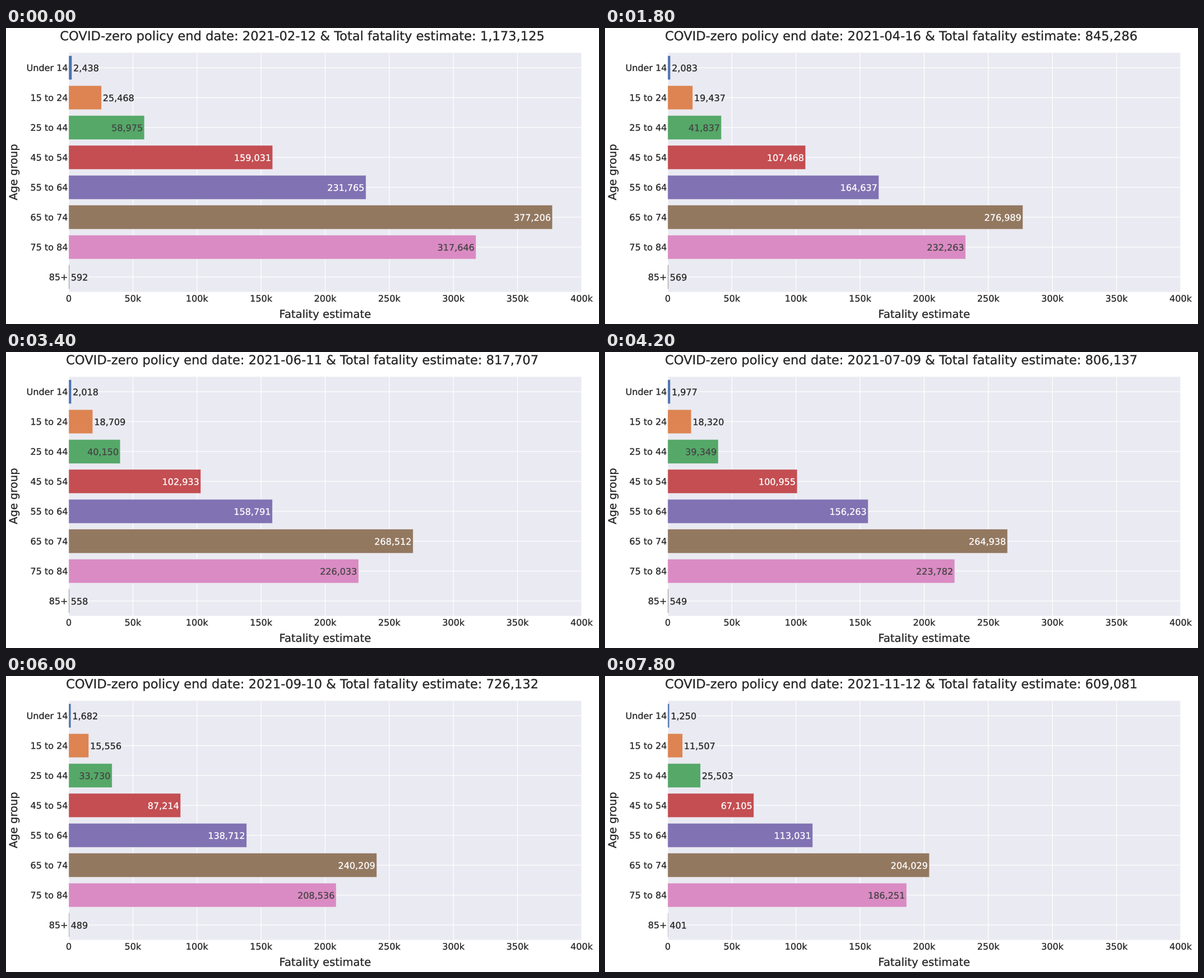
Animation, 1058 px wide and 529 px high, one loop 8000 ms. Source, as a matplotlib script:

```python
import numpy as np
import matplotlib.pyplot as plt
from matplotlib.animation import FuncAnimation
from matplotlib.patches import Rectangle
from matplotlib.patheffects import Stroke

plt.rcParams["font.family"] = "DejaVu Sans"
plt.rcParams["text.hinting"] = "none"

W, H, DPI = 1058, 529, 64
PT = 72 / DPI  # points per pixel
STEPS, INTERVAL = 40, 200
START = np.datetime64("2021-02-12")

# Plot area in pixels
LEFT, RIGHT, TOP, BOTTOM = 112, 1027, 44.3, 471.7
X_MAX = 400_000
PITCH = (BOTTOM - TOP) / 8
BAR_H = 0.8 * PITCH
MIN_INSIDE = 63  # narrowest bar that holds its label

INK, DARK, PAPER = "#242424", "#444444", "#eaeaf2"

# Name, fill, inside label colour, first and last count,
# and the share of the fall that belongs to the slow trend
GROUPS = [
    ("Under 14", "#4c72b0", DARK, 2438, 1250, 0.74),
    ("15 to 24", "#dd8452", DARK, 25468, 11507, 0.59),
    ("25 to 44", "#55a868", DARK, 58975, 25503, 0.50),
    ("45 to 54", "#c44e52", "white", 159031, 67105, 0.445),
    ("55 to 64", "#8172b3", "white", 231765, 113031, 0.44),
    ("65 to 74", "#937860", "white", 377206, 204029, 0.425),
    ("75 to 84", "#da8bc3", DARK, 317646, 186251, 0.345),
    ("85+", "#8c8c8c", DARK, 592, 401, 0.94),
]


def estimate(week, first, last, slow_share):
    """A steep early drop plus a slow decline that speeds up late."""
    fast = np.exp(-week / 2.87)
    slow = np.interp(week, [0, 20, 26, STEPS - 1], [1, 0.85, 0.71, 0])
    left = slow_share * slow + (1 - slow_share) * fast
    return last + 0.5 + (first - last) * left


fig = plt.figure(figsize=(W / DPI, H / DPI), dpi=DPI, facecolor="white")
ax = fig.add_axes([0, 0, 1, 1])
ax.set_xlim(0, W)
ax.set_ylim(H, 0)
ax.axis("off")


def to_x(value):
    return LEFT + (RIGHT - LEFT) * value / X_MAX


def box(x, y, w, h, **style):
    return ax.add_patch(Rectangle((x, y), w, h, snap=False, **style))


def line(xs, ys):
    ax.plot(xs, ys, color="white", lw=1.3 * PT, snap=False,
            solid_capstyle="butt", zorder=1)


def write(x, y, text, px, ha="center", **style):
    # A hairline stroke gives the letters a slightly heavier weight
    return ax.text(x, y, text, fontsize=px * PT, color=INK, ha=ha,
                   va="baseline", zorder=4,
                   path_effects=[Stroke(linewidth=0.3 * PT)], **style)


box(LEFT, TOP, RIGHT - LEFT, BOTTOM - TOP, fc=PAPER, lw=0, zorder=0)
for tick in range(0, X_MAX + 1, 50_000):
    x = to_x(tick)
    line([x, x], [TOP, BOTTOM])
    write(x, 489, f"{tick // 1000}k" if tick else "0", 16)

bars, labels = [], []
for i, (name, fill, *_) in enumerate(GROUPS):
    y = TOP + (i + 0.5) * PITCH
    line([LEFT, RIGHT], [y, y])
    write(110.5, y + 5.8, name, 16, ha="right")
    bars.append(box(LEFT, y - BAR_H / 2, 0, BAR_H, fc=fill, ec=PAPER,
                    lw=0.5 * PT, zorder=2))
    labels.append(write(LEFT, y + 6.3, "", 16))

title = write(529, 22, "", 22.6)
write(569.5, 518, "Fatality estimate", 19.6)
write(20, 257.5, "Age group", 19.5, rotation=90, rotation_mode="anchor")


def update(week):
    total = 0
    for bar, label, (_, _, color, *trend) in zip(bars, labels, GROUPS):
        count = estimate(week, *trend)
        total += count
        end = to_x(count)
        inside = end - LEFT >= MIN_INSIDE
        bar.set_width(end - LEFT)
        label.set_text(f"{int(count):,}")
        label.set_x(end - 2.7 if inside else end + 2.5)
        label.set_ha("right" if inside else "left")
        label.set_color(color if inside else INK)
    title.set_text(f"COVID-zero policy end date: {START + 7 * week}"
                   f" & Total fatality estimate: {int(total):,}")
    return [*bars, *labels, title]


anim = FuncAnimation(fig, update, frames=STEPS, interval=INTERVAL,
                     repeat=True, repeat_delay=0, blit=False)
plt.show()
```
